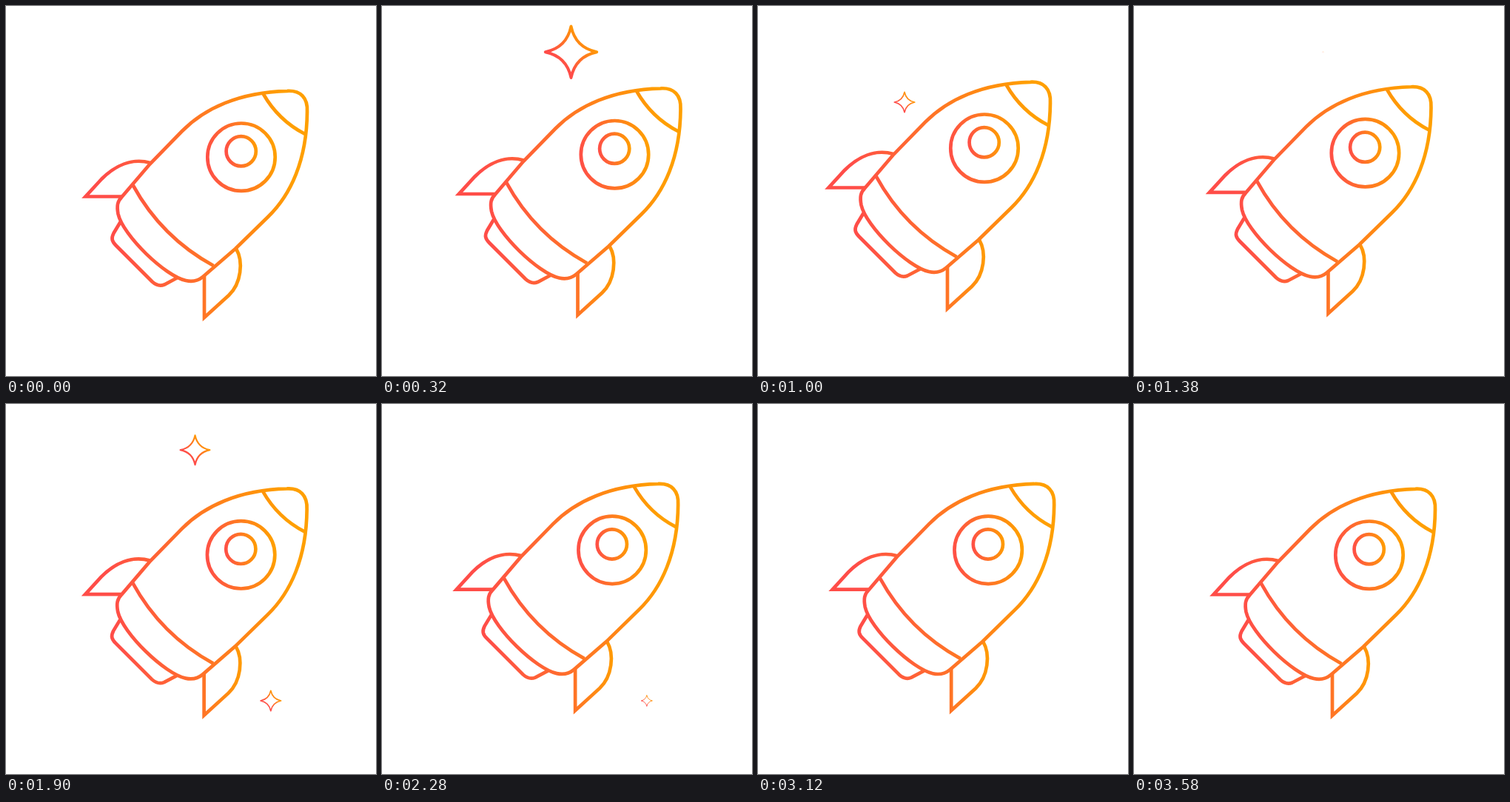
These frames come from a looping animation (500 by 500 pixels, 3.6 s). An HTML page with a canvas:

```html
<!DOCTYPE html>
<html lang="en">
<head>
<meta charset="utf-8">
<title>Rocket</title>
<style>
  html, body { margin: 0; width: 100%; height: 100%; overflow: hidden; background: #fff; }
  canvas { display: block; width: 500px; height: 500px; }
</style>
</head>
<body>
<canvas id="stage" width="500" height="500"></canvas>
<script>
const ctx = document.getElementById('stage').getContext('2d');
const LOOP = 3600;
const BOB = { period: 1800, reach: 12.4 };
const RED = '#ff4d48';
const ORANGE = '#ff9f00';

function gradient(x0, y0, x1, y1) {
  const g = ctx.createLinearGradient(x0, y0, x1, y1);
  g.addColorStop(0, RED);
  g.addColorStop(1, ORANGE);
  return g;
}

function circle(x, y, r) {
  const path = new Path2D();
  path.arc(x, y, r, 0, Math.PI * 2);
  return path;
}

const hull = gradient(140, 250, 390, 220);
const rocket = [
  // engine
  [new Path2D('M154.5 292L145.5 307C142 314 143 318 148.5 323.5L197.5 372.5C203 377.5 208 379 214 376.5L231 367.5'), hull],
  // fins
  [new Path2D('M195 212C170 205 147 216 129 234L107.5 257.5L156 257.5'), hull],
  [new Path2D('M311 328C321 345 318 375 301 391L268 421L268 364'), gradient(215, 0, 325, 0)],
  // body
  [new Path2D('M156.5 258L194.5 213.5L238 169C268 138.5 315 116.5 380 114.8C398 113.8 408 124 407 143' +
    'C406.5 208 385 255 354 285L310 328L266 366C260 371 252 373 243 371' +
    'C215 365 158 310 151.5 281C149.5 270 150.5 264 156.5 258Z'), hull],
  // band and nose seam
  [new Path2D('M171.5 242Q210 312.5 280.5 351'), hull],
  [new Path2D('M347.5 118.5Q368 154.5 404 173'), hull],
  // window
  [circle(318, 204.2, 45.7), gradient(268, 210, 364, 198)],
  [circle(317.7, 196.3, 20.1), gradient(295, 198, 341, 194)]
];

const stars = [
  { x: 255.5, y: 62.2, size: 39, line: 4.2, start: 0, life: 760 },
  { x: 198, y: 130, size: 25, line: 3, start: 480, life: 720 },
  { x: 255.5, y: 62.2, size: 39, line: 4.2, start: 1340, life: 760 },
  { x: 357.8, y: 401, size: 24.7, line: 2.8, start: 1700, life: 720 }
];

// 0 at both ends of the cycle, 1 in the middle
const swell = p => (1 - Math.cos(p * Math.PI * 2)) / 2;

function drawStar(star, time) {
  const p = (time - star.start) / star.life;
  if (p <= 0 || p >= 1) return;
  const scale = swell(p);
  if (scale < 0.004) return;
  const tip = star.size - star.line / 2;
  const waist = tip * 0.17;
  ctx.save();
  ctx.translate(star.x, star.y);
  ctx.scale(scale, scale);
  ctx.lineJoin = 'round';
  ctx.lineWidth = star.line;
  ctx.strokeStyle = gradient(-tip * 0.4, tip * 0.4, tip * 0.6, -tip * 0.6);
  ctx.beginPath();
  ctx.moveTo(0, -tip);
  ctx.quadraticCurveTo(waist, -waist, tip, 0);
  ctx.quadraticCurveTo(waist, waist, 0, tip);
  ctx.quadraticCurveTo(-waist, waist, -tip, 0);
  ctx.quadraticCurveTo(-waist, -waist, 0, -tip);
  ctx.closePath();
  ctx.stroke();
  ctx.restore();
}

function drawRocket(time) {
  const shift = -BOB.reach * swell(time / BOB.period);
  ctx.save();
  ctx.translate(shift, shift);
  ctx.lineWidth = 4.7;
  ctx.lineJoin = 'miter';
  for (const [path, paint] of rocket) {
    ctx.strokeStyle = paint;
    ctx.stroke(path);
  }
  ctx.restore();
}

function render(time) {
  ctx.fillStyle = '#fff';
  ctx.fillRect(0, 0, 500, 500);
  drawRocket(time);
  for (const star of stars) drawStar(star, time);
}

const begin = performance.now();
function tick() {
  render((performance.now() - begin) % LOOP);
  requestAnimationFrame(tick);
}
tick();
</script>
</body>
</html>
```
